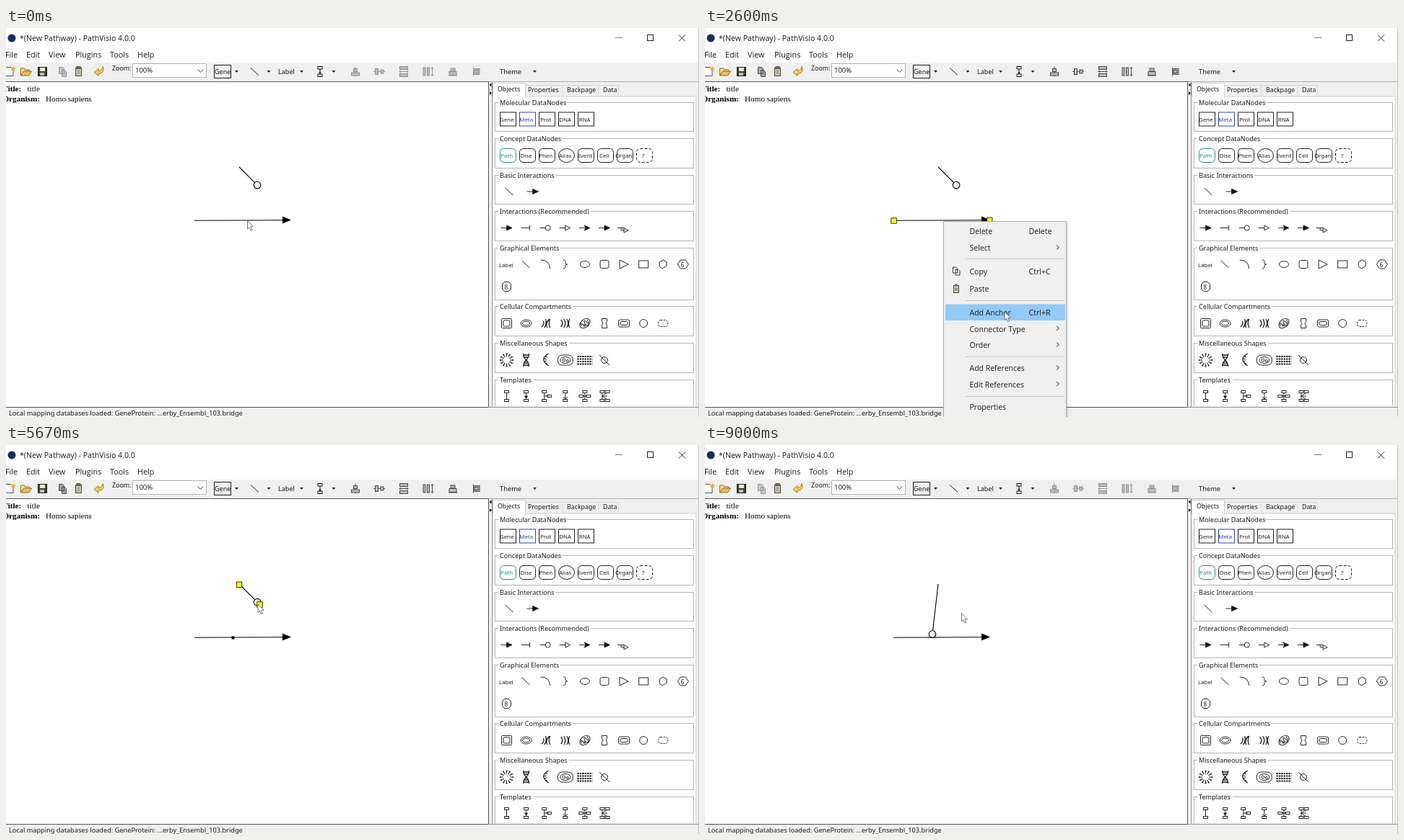
An HTML page that plays this animation: 960 px wide and 540 px high, repeating every 9.07 s.

```html
<!DOCTYPE html>
<html lang="en">
<head>
<meta charset="utf-8">
<title>Pathway editor</title>
<style>
  html, body { margin: 0; width: 100%; height: 100%; overflow: hidden; background: #fff; }
  svg { display: block; width: 960px; height: 540px; }
  text { font-family: "Noto Sans", "Open Sans", sans-serif; fill: #1a1a1a; white-space: pre; }
  .win { font-family: "Open Sans", "Noto Sans", sans-serif; }
  .doc { font-family: "Liberation Serif", serif; fill: #000; }
  .ico { fill: none; stroke: #1c1c1c; stroke-width: .95; }
  .ico text { stroke: none; }
  .tool { color: #909090; }
  .tool.on { color: #484848; }
</style>
</head>
<body>
<svg id="stage" viewBox="0 0 960 540" xmlns="http://www.w3.org/2000/svg"></svg>
<script>
const svg = document.getElementById('stage');
const rect = (x, y, w, h, fill, stroke = 'none', more = '') =>
  `<rect x="${x}" y="${y}" width="${w}" height="${h}" fill="${fill}" stroke="${stroke}" ${more}/>`;
const path = (d, more = '') => `<path d="${d}" ${more}/>`;
const text = (x, y, s, size = 9.1, more = '', color = '') =>
  `<text x="${x}" y="${y}" style="font-size:${size}px;${color && 'fill:' + color}" ${more}>${s}</text>`;
const group = (body, more = '') => `<g ${more}>${body}</g>`;
const at = (x, y, body) => group(body, `transform="translate(${x} ${y})"`);
const solid = 'fill="#111"';
const drop = x => path(`M${x - 2.5} 59h5l-2.5 3z`, 'fill="#222"');

function titleBar() {
  const menus = [['File', -1], ['Edit', 28], ['View', 59], ['Plugins', 96], ['Tools', 144], ['Help', 182]];
  return rect(0, 0, 960, 540, '#fff') +
    '<circle cx="8" cy="14" r="5.5" fill="#1d2a5c"/>' +
    text(19, 18, '*(New Pathway) - PathVisio 4.0.0', 10.6, 'class="win"') +
    path('M844 13.5h10', 'stroke="#777"') +
    rect(888.5, 9.5, 8, 8, 'none', '#222') +
    path('M932 9.5l9 9m0 -9l-9 9', 'stroke="#222"') +
    menus.map(([s, x]) => text(x, 41, s, 10.8, 'class="win"')).join('');
}

function toolBar() {
  const copy = path('M-5 -6h5l2 2v7h-7z M-1 -2h4l2 2v7h-6z', 'fill="currentColor" fill-opacity=".45" stroke="currentColor"');
  const aligns = [
    [484, 'M0 -7v14', [-2.5, -4, 5, 4, -5.5, 1.5, 11, 4]],
    [517, 'M-8 0h16', [-5.5, -4, 4, 8, 2, -2.5, 4, 5]],
    [551, 'M-6 0h12m-10 -2l-2 2 2 2m8 -4l2 2 -2 2', [-5.5, -7, 11, 4, -5.5, 3, 11, 4]],
    [585, 'M5.5 -6v12m-2 -10l2 -2 2 2m-4 8l2 2 2 -2', [-7, -5.5, 3, 11, -1.5, -5.5, 3, 11]],
    [619, 'M-6 5.5h12', [-3, -4.5, 6, 4, -5, 0, 10, 5]],
    [652, 'M-4.5 -6v12', [-3, -4, 7, 8, -3, -2, 5, 4]]
  ];
  return rect(0, 48, 960, 492, '#f0f0f0') +
    path('M-1 54.5h8l3 3v9h-11z', 'fill="#fff" stroke="#555"') +
    path('M10 52l1 3 3 0 -2 2 1 3 -3 -2 -3 2 1 -3 -2 -2 3 0z', 'fill="#e3b738"') +
    path('M20.5 66v-10h5l1 2h6v3', 'fill="#f7e29a" stroke="#8a6a1c"') +
    path('M20.5 66l4 -6h11l-4 6z', 'fill="#eec14a" stroke="#8a6a1c"') +
    rect(44.5, 54.5, 12, 12, '#3c3f35', '#222') + rect(47, 55, 7, 5, '#ece9cf') + rect(47, 62, 6, 4, '#bbb') +
    at(78.5, 60.5, group(copy, 'class="tool"')) +
    rect(96.5, 55.5, 8, 11, '#cfc8b8', '#4d4538') + rect(98, 53.5, 5, 3, '#777', '#333', 'stroke-width=".8"') +
    path('M98.5 59.5h4m-4 2h4m-4 2h4', 'stroke="#777" stroke-width=".8"') +
    path('M122 61.5l6 -5v3q5 0 6 -6q4 9 -6 10v3z', 'fill="#f0cf55" stroke="#96741a" stroke-width=".9"') +
    text(147, 58.5, 'Zoom:', 8.9) +
    rect(175.5, 49.5, 102, 19, '#fff', '#b5b5b5') + text(179, 62, '100%', 9.5) +
    path('M265.5 57.5l4 4 4 -4', 'fill="none" stroke="#444"') +
    rect(288.5, 51.5, 23, 18, '#f0f0f0', '#222') + text(289, 64, 'Gene', 9) + drop(319.5) +
    path('M339 55.5l11 10', 'stroke="#222"') + drop(364) +
    text(377, 64, 'Label', 9.1) + drop(409.5) +
    at(435, 60.5, path('M0 -4v8', 'stroke="#111"') + rect(-3, -7, 6, 3.5, '#fff', '#111') +
      rect(-3, 3.5, 6, 3.5, '#fff', '#111') + path('M-2 1h4l-2 2.5z', solid)) +
    drop(454) +
    group(aligns.map(([x, d, b]) => at(x, 60.5,
      path(d, 'fill="none" stroke="currentColor"') +
      [0, 4].map(i => rect(b[i], b[i + 1], b[i + 2], b[i + 3], '#bbb', 'currentColor')).join(''))).join(''), 'class="tool"') +
    text(684, 64, 'Theme', 9.3) + drop(732.5);
}

function documentArea() {
  return rect(0, 75, 668, 451, '#fff') +
    path('M668 74.5h292', 'stroke="#b0b0b0"') +
    path('M0 74.5h668.5v452H0', 'fill="none" stroke="#555"') +
    path('M673.5 75v452', 'stroke="#777"') +
    path('M672.5 76.5v5l-3 -2.5z M670 88v5l3 -2.5z', 'fill="#111"') +
    text(-4.6, 88, 'Title:', 11.2, 'class="doc" font-weight="700"') + text(29.5, 88, 'title', 11.2, 'class="doc"') +
    text(-4.6, 101.5, 'Organism:', 11.2, 'class="doc" font-weight="700"') + text(55, 101.5, 'Homo sapiens', 11.2, 'class="doc"') +
    text(4, 537.5, 'Local mapping databases loaded: GeneProtein: ...erby_Ensembl_103.bridge', 9.2);
}

function node(i, y, label, kind, color = '#1c1c1c') {
  const x = 684.5 + Math.round(i * 27.05);
  const round = kind === 'box' ? '' : 'rx="5"';
  const dash = kind === 'dash' ? 'stroke-dasharray="4 2"' : '';
  const shape = kind === 'oval'
    ? `<ellipse cx="${x + 11}" cy="${y}" rx="11" ry="9.5" fill="none" stroke="${color}"/>`
    : rect(x, y - 9.5, 22, 19, 'none', color, `${round} ${dash}`);
  return shape + text(x + 9.2, y + 3.3, label, 7.9, 'text-anchor="middle"', color);
}

function smallIcons() {
  const col = i => 693.5 + i * 27.1;
  const row = (y, list) => list.map((d, i) => at(col(i), y, d)).join('');
  const oval = (rx, ry, more = '') => `<ellipse rx="${rx}" ry="${ry}" ${more}/>`;
  const box = (w, h, r = 0, more = '') => rect(-w / 2, -h / 2, w, h, 'none', '#1c1c1c', `rx="${r}" ${more}`);
  const arrow = (head, more = '') => path('M-8 0h10') + path(head, more);
  const ring = (n, r1, r2) => Array.from({ length: n }, (_, i) => {
    const a = i * 2 * Math.PI / n, c = Math.cos(a), s = Math.sin(a);
    return `M${(c * r1).toFixed(1)} ${(s * r1).toFixed(1)}L${(c * r2).toFixed(1)} ${(s * r2).toFixed(1)}`;
  }).join('');
  const end = (x, y) => at(x, y, box(6, 3));
  const link = end(0, -6) + end(0, 6) + path('M0 -4.5v9');
  return row(227, [path('M-2 -5l11 10'), at(9, 0, arrow('M0 -3.5l8 3.5 -8 3.5z', solid))]) +
    row(277.5, [
      arrow('M0 -3.5l7.5 3.5 -7.5 3.5z', solid),
      path('M-7 0h12m0 -3.5v7'),
      path('M-8 0h8') + '<circle cx="3" r="3.5"/>',
      path('M-8 0h8m0 -3.5l7 3.5 -7 3.5z'),
      arrow('M-1 -3.5l8 3.5 -8 3.5 2.5 -3.5z', solid),
      arrow('M0 -3.5l7.5 3.5 -7.5 3.5z', solid),
      path('M-9 0h9m0 0v6.500l6 -3.200z M-4 0v3.200h4')
    ]) +
    text(683, 332, 'Label', 7.9) + text(934.7, 331.5, '6', 8) + text(690.5, 362.5, '8', 8) +
    row(328, ['', path('M-6 -5l11 10'), path('M-7 -6q12 0 13 12'),
      path('M-3 -6q4 0 3 4q0 2 3 2q-3 0 -3 2q1 4 -3 4'), oval(6.5, 4.5), box(12, 11, 2.5),
      path('M-6 -6l12 6 -12 6z'), box(13, 10), path('M-5 -3l5 -3 5 3v5l-6 4 -4 -3z'),
      path('M-7 0l4 -6h7l4 6 -4 6h-7z')]) +
    at(693.5, 359, path('M-6 -3l3 -3.5h6l3 3.5v6l-3 3.5h-6l-3 -3.5z')) +
    row(410, [box(14, 13, 1) + box(9, 8, 1), oval(7.5, 5) + oval(5, 2.8),
      path('M-6 5q4 -2 3 -8m1 9q4 -5 2 -12m2 12q-3 -6 3 -12m1 12q-3 -6 0 -12', 'stroke-width="1.3"'),
      path('M-6 -5q4 5 0 10m4 -11q4 6 0 12m4 -12q4 6 0 12m4 -12q-3 6 0 12', 'stroke-width="1.3"'),
      group(oval(8, 5.5) + path('M-6 0q2 -7 3 0t3 0t3 0t3 -2M-4 3q2 -4 4 0t4 -1'), 'transform="rotate(-40)"'),
      path('M-3.5 -6.5h7v4l-1.5 2.5 1.5 2.5v4h-7v-4l1.5 -2.5 -1.5 -2.5z'),
      box(15, 10, 2) + box(10, 5, 1.5), oval(5.5, 5.5), box(13, 9, 3, 'stroke-dasharray="2.5 1.5"')]) +
    row(461, [path(ring(12, 4.5, 8), 'stroke-width="1.1"') + path(ring(12, 8, 9.5), 'stroke-width="2"'),
      path('M-4 -9q0 5 4 9t4 9M4 -9q0 5 -4 9t-4 9M-4 -7h8m-7 3h6m-6 8h6m-7 3h8', 'stroke-width="1.3"'),
      path('M4 -9q-7 4 -7 8t7 9m-5 -14l3 2m-4 2l3 1m-3 3l3 -1m-1 5l2 -2', 'stroke-width="1.3"'),
      box(21, 14, 6) + oval(7, 4.5) + '<circle cx="-2" r="2"/><circle cx="3" cy="1" r="1.5"/>',
      path('M-10.5 -5h21m-21 3.5h21m-21 3.5h21m-21 3.5h21', 'stroke-width="2.2" stroke-dasharray="2.4 1"'),
      oval(4.5, 4.5) + path('M-7 -7l14 14')]) +
    row(511, [link, link + path('M-2 0h4l-2 3z', solid), at(-2, 0, link + path('M0 0h6') + end(7, 0)),
      link + path('M-3 1l3 3 3 -3'), link + path('M-3 0h6') + end(-5, 0) + end(5, 0),
      at(-3, 0, link + path('M0 0l7 -5m-7 5l7 5m-8 -5h8') + end(7, -6) + end(7, 6))]);
}

function sidePanel() {
  // [title, y, box height, title width]
  const heads = [['Molecular DataNodes', 103, 40, 91], ['Concept DataNodes', 153.5, 41, 84],
    ['Basic Interactions', 204.5, 40, 76], ['Interactions (Recommended)', 254.5, 41, 126],
    ['Graphical Elements', 305.5, 72, 83], ['Cellular Compartments', 386.5, 41, 100],
    ['Miscellaneous Shapes', 437.5, 41, 95], ['Templates', 488, 60, 46]];
  const tabs = [['Objects', 681], ['Properties', 723], ['Backpage', 777], ['Data', 827]];
  return path('M719.5 95v-15.5h129v15.5m-27.5 0v-15.5m-50 0v15.5', 'fill="none" stroke="#d4d4d4"') +
    rect(674, 95, 282, 431, '#fff', '#d0d0d0') + rect(674.5, 76.5, 45, 20, '#fff', '#d0d0d0') + rect(675, 94, 44, 4, '#fff') +
    tabs.map(([s, x], i) => text(x, i ? 89 : 88, s, 8.8)).join('') +
    group(heads.map(([s, y, h, w]) =>
      rect(677.5, Math.floor(y) + .5, 275, h, 'none', '#b4b4b4') +
      rect(682, y - 2, w + 3, 5, '#fff') + text(684, y + 3.5, s, 9.1)).join(''), 'clip-path="url(#panel)"') +
    ['Gene', 'Meta', 'Prot', 'DNA', 'RNA'].map((s, i) =>
      node(i, 126.5, s, 'box', i === 1 ? '#2544c8' : undefined)).join('') +
    ['Path', 'Dise', 'Phen', 'Alias', 'Event', 'Cell', 'Organ', '?'].map((s, i) =>
      node(i, 177, s, i === 3 ? 'oval' : i === 7 ? 'dash' : 'round', i ? undefined : '#238f78')).join('') +
    group(smallIcons(), 'class="ico"') +
    path('M959.5 0v540', 'stroke="#c4c4c4"') + path('M669 526.5h291', 'stroke="#999"');
}

const items = [['Delete', 282, 'Delete'], ['Select', 305, '>'], ['Copy', 338, 'Ctrl+C'], ['Paste', 362, ''],
  ['Add Anchor', 395, 'Ctrl+R'], ['Connector Type', 417.5, '>'], ['Order', 440, '>'],
  ['Add References', 472, '>'], ['Edit References', 494.5, '>'], ['Properties', 526, '']];

function contextMenu() {
  return rect(501, 271, 2, 270, '#000', 'none', 'opacity=".12"') +
    rect(330.5, 268.5, 170, 280, '#f0f0f0', '#a5a5a5') +
    '<rect id="hover" x="333" width="166" height="22.5" fill="#91c9f7"/>' +
    [320, 378, 456, 511].map(y => path(`M361 ${y}.5h137`, 'stroke="#c8c8c8"')).join('') +
    items.map(([s, y, key]) => text(366.5, y + 4, s, 10.5, 'class="win"') +
      (key === '>' ? path(`M487 ${y - 3.5}l3.5 3 -3.5 3`, 'fill="none" stroke="#333"') : text(448.5, y + 4, key, 10.6, 'class="win"'))).join('') +
    at(348, 337, path('M-4.5 -5h4l2 2v6h-6z M-1 -1.5h4l2 2v5.5h-6z', 'fill="#fff" stroke="#333"')) +
    rect(344.5, 357.5, 7, 10, '#cfc8b8', '#4d4538') + rect(346, 355.5, 4, 3, '#777') +
    path('M346 361.5h4m-4 2h4', 'stroke="#777"');
}

const handle = id => `<rect id="${id}" x="-3.5" y="-3.5" width="7.5" height="7.5" fill="#ff0" stroke="#222" stroke-width=".9"/>`;
svg.innerHTML = '<defs><clipPath id="panel"><rect x="674" y="95" width="284" height="430"/></clipPath></defs>' +
  titleBar() + toolBar() + documentArea() + sidePanel() +
  path('M261 267.3L388 266.7', 'stroke="#000" stroke-width="1.1"') + path('M383 261.6L395 266.6 383 271.5z') +
  rect(312.5, 265.5, 4, 4, '#000', 'none', 'id="anchor"') +
  '<line id="stem" x1="323" y1="193" stroke="#000" stroke-width="1.1"/><circle id="knob" r="4.8" fill="#fff" stroke="#000" stroke-width="1.1"/>' +
  group(at(261.3, 267.3, handle('left')) + at(394, 266.7, handle('right')), 'id="arrowSel"') +
  group(at(322.8, 193.5, handle('top')) + handle('tail'), 'id="stemSel"') +
  group(contextMenu(), 'id="menu"') +
  path('M0 0v11.5l2.6 -2.4 2 4.6 2 -.9 -2 -4.5h3.6z', 'id="cursor" fill="#fff" stroke="#666" stroke-width=".9"');

const $ = id => document.getElementById(id);
const tools = svg.querySelectorAll('.tool');
const show = (id, on) => $(id).setAttribute('visibility', on ? 'visible' : 'hidden');
const move = (id, [x, y]) => $(id).setAttribute('transform', `translate(${x} ${y})`);
const within = (t, a, b) => t >= a && t < b;

// [ms, x, y] of the pointer tip
const track = [[0, 334.5, 267.5], [70, 334.5, 267.5], [670, 331.3, 267.5], [1670, 331.3, 267.5], [2530, 415, 394],
  [3533, 415, 394], [3733, 382.8, 322], [4000, 348.5, 234.5], [4400, 348.5, 234.5], [4667, 349, 221],
  [5667, 349, 221], [6533, 312, 267], [6867, 312, 267], [7130, 347.7, 234.5],
  [7867, 347.7, 234.5], [8000, 355.3, 233.5], [9070, 355.3, 233.5]];

function pointer(t) {
  const i = Math.max(1, track.findIndex(k => k[0] >= t));
  const [t0, x0, y0] = track[i - 1], [t1, x1, y1] = track[i];
  const p = (t - t0) / (t1 - t0);
  return [x0 + (x1 - x0) * p, y0 + (y1 - y0) * p];
}

function stemEnd(t, [x, y]) {
  if (t < 5667) return [351.3, 221.3];
  return t < 6600 ? [x + 2.3, y + .3] : [314.5, 267];
}

const LOOP = 9070, STEP = 1000 / 15;

function draw(ms) {
  // the slack lets steps rounded to 10 ms start on time
  const t = Math.floor((ms % LOOP + 5) / STEP) * STEP + .5;
  const tip = pointer(t), [ex, ey] = stemEnd(t, tip);
  const dx = ex - 323, dy = ey - 193, len = Math.hypot(dx, dy);
  const knob = [ex - dx / len * 4.5, ey - dy / len * 4.5];
  const arrowOn = within(t, 866, 4200), stemOn = within(t, 4866, 7600);

  move('cursor', tip);
  move('knob', knob);
  move('tail', [ex, ey]);
  $('stem').setAttribute('x2', knob[0]);
  $('stem').setAttribute('y2', knob[1]);
  show('arrowSel', arrowOn);
  show('stemSel', stemOn);
  show('anchor', within(t, 2933, 6600));
  tools.forEach(g => g.classList.toggle('on', arrowOn || stemOn));

  const open = within(t, 1666, 2933);
  const hit = items.find(k => Math.abs(k[1] - tip[1]) <= 11.3);
  show('menu', open);
  show('hover', open && t > 1730 && hit);
  if (hit) $('hover').setAttribute('y', hit[1] - 11.5);
}

const start = performance.now();
function tick(now) {
  draw(Math.max(0, now - start));
  requestAnimationFrame(tick);
}
draw(0);
requestAnimationFrame(tick);
</script>
</body>
</html>
```
